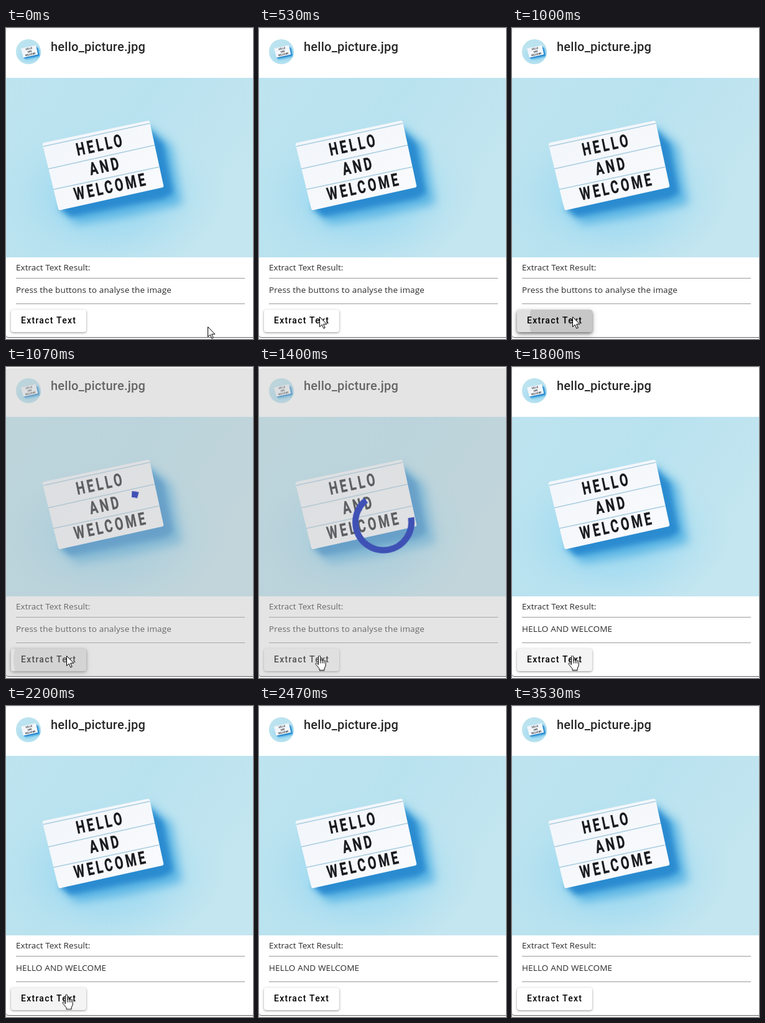
These frames come from a looping animation (397x499 px, 3590 ms). An HTML page:

```html
<!DOCTYPE html>
<html lang="en">
<head>
<meta charset="utf-8">
<title>Extract text</title>
<style>
  html, body { margin: 0; width: 100%; height: 100%; overflow: hidden; background: #f7f7f7; }
  svg { display: block; }

  .title { font: 500 20px Roboto, sans-serif; letter-spacing: .25px; fill: #262626; }
  .body { font: 13.5px "Open Sans", "Noto Sans", sans-serif; letter-spacing: .16px; fill: #2b2b2b; }
  .label { letter-spacing: .05px; }
  .caption { font: 500 14px Roboto, sans-serif; letter-spacing: 1.25px; fill: #000; }
  .sign { font: 700 28px Roboto, sans-serif; letter-spacing: 5.7px; text-anchor: middle; fill: #17191d; stroke: #17191d; stroke-width: .4; }
  .card { fill: #fff; filter: drop-shadow(0 1px .6px #0009); }
  .rule { fill: #9a9a9a; }

  /* Every animation shares one 3590 ms cycle. */
  .prompt, .answer, .busy, .arrow, .hand, .cursor, .button, .state, .ripple, .ring, .arc {
    animation: 3590ms linear infinite;
  }
  .prompt, .answer, .busy, .arrow, .hand { animation-timing-function: step-end; }

  .prompt { animation-name: prompt; }
  .answer { animation-name: answer; }
  .busy { animation-name: busy; }
  .arrow { animation-name: arrow; }
  .hand { animation-name: hand; }
  @keyframes prompt { 0% { opacity: 1; } 50.13%, 100% { opacity: 0; } }
  @keyframes answer { 0% { opacity: 0; } 50.13%, 100% { opacity: 1; } }
  @keyframes busy { 0% { opacity: 0; } 29.8% { opacity: 1; } 50.13%, 100% { opacity: 0; } }
  @keyframes arrow { 0% { opacity: 1; } 39% { opacity: 0; } 64.9%, 100% { opacity: 1; } }
  @keyframes hand { 0% { opacity: 0; } 39% { opacity: 1; } 64.9%, 100% { opacity: 0; } }

  .cursor { animation-name: travel; }
  @keyframes travel {
    0%, 1.95% { transform: translate(324px, 479px); animation-timing-function: ease-in-out; }
    14.76%, 61.2% { transform: translate(97px, 463px); animation-timing-function: ease-in; }
    68.7%, 99.99% { transform: translate(180px, 506px); }
    100% { transform: translate(324px, 479px); }
  }

  .button { fill: #fff; animation-name: lift; }
  @keyframes lift {
    0%, 25.9% { filter: drop-shadow(0 1px 1px #0004) drop-shadow(0 1px 2px #0003); }
    27.8%, 29% { filter: drop-shadow(0 2px 2px #0006) drop-shadow(0 3px 4px #0004); }
    36%, 100% { filter: drop-shadow(0 1px 1px #0004) drop-shadow(0 1px 2px #0003); }
  }

  .state { animation-name: state; }
  @keyframes state {
    0%, 16.7% { opacity: 0; }
    20.3%, 25.9% { opacity: .045; }
    27.8%, 28.5% { opacity: .12; }
    29.8%, 48.2% { opacity: 0; }
    50.13%, 64.9% { opacity: .045; }
    68.7%, 100% { opacity: 0; }
  }

  .ripple { transform-origin: 97px 470px; animation-name: ripple; }
  @keyframes ripple {
    0%, 25.9% { transform: scale(0); opacity: .11; }
    27.86% { transform: scale(.75); }
    29.81% { transform: scale(.92); }
    32.2% { transform: scale(1); opacity: .11; }
    41%, 100% { transform: scale(1); opacity: 0; }
  }

  .ring { transform-origin: 200px 249px; animation-name: spin; }
  @keyframes spin {
    0%, 29.8% { transform: rotate(-87.5deg); }
    50.13%, 100% { transform: rotate(84.5deg); }
  }
  .arc { fill: none; stroke: #3f51b5; stroke-width: 10; animation-name: sweep; }
  @keyframes sweep {
    0%, 29.8% { stroke-dasharray: 13 360; stroke-dashoffset: 0; animation-timing-function: cubic-bezier(.35, 0, .25, 1); }
    46.24% { stroke-dasharray: 288 360; stroke-dashoffset: 0; animation-timing-function: cubic-bezier(.35, 0, .25, 1); }
    62.67%, 100% { stroke-dasharray: 18 360; stroke-dashoffset: -270; }
  }
</style>
</head>
<body>
<svg width="397" height="499" viewBox="0 0 397 499">
  <defs>
    <linearGradient id="sky" x1="0" y1="0" x2="1" y2=".5">
      <stop offset="0" stop-color="#bde4ef"/>
      <stop offset=".5" stop-color="#b9e2ef"/>
      <stop offset="1" stop-color="#c4e6f0"/>
    </linearGradient>
    <radialGradient id="glow">
      <stop offset="0" stop-color="#98d7f0"/>
      <stop offset=".5" stop-color="#a6dcf1" stop-opacity=".8"/>
      <stop offset="1" stop-color="#b9e2ef" stop-opacity="0"/>
    </radialGradient>
    <linearGradient id="face" x1="0" y1="0" x2="1" y2="1">
      <stop offset="0" stop-color="#f1f5fa"/>
      <stop offset="1" stop-color="#fafbfd"/>
    </linearGradient>
    <filter id="soft" x="-30%" y="-30%" width="160%" height="160%"><feGaussianBlur stdDeviation="8"/></filter>
    <filter id="near" x="-30%" y="-30%" width="160%" height="160%"><feGaussianBlur stdDeviation="4"/></filter>
    <clipPath id="frame"><path d="M0 80H400V368H0Z"/></clipPath>
    <clipPath id="round"><circle cx="36" cy="38" r="20"/></clipPath>
    <clipPath id="pill"><rect x="8" y="452" width="121" height="36" rx="4"/></clipPath>

    <g id="photo" clip-path="url(#frame)">
      <path d="M0 80H400V368H0Z" fill="url(#sky)"/>
      <ellipse cx="165" cy="270" rx="190" ry="125" fill="url(#glow)"/>
      <path d="M228 158L266 188 283 282 200 301 114 315 86 289Z" fill="#5cb5e4" filter="url(#soft)"/>
      <path d="M230 162L253 186 269 265 254 274 104 303 86 289Z" fill="#2c8bd0" filter="url(#near)"/>
      <path d="M61 184L227 149Q230 148 231 151L253 252Q254 255 251 256L88 292Q85 293 84 290L59 188Q58 185 61 184Z" fill="url(#face)"/>
      <path d="M60 190L231 153M68 226L239 188M76 259L246 223" fill="none" stroke="#a9cde0" stroke-width="1.4"/>
      <g class="sign">
        <text x="2.8" y="10" transform="translate(149.5 187.5) rotate(-12) scale(.7 1)">HELLO</text>
        <text x="2.8" y="10" transform="translate(157.5 221.5) rotate(-12) scale(.7 1)">AND</text>
        <text x="2.8" y="10" transform="translate(166.5 254.5) rotate(-12) scale(.7 1)">WELCOME</text>
      </g>
    </g>
  </defs>

  <rect class="card" y="2" width="400" height="494" rx="4"/>
  <g clip-path="url(#round)">
    <use href="#photo" transform="translate(16 18) scale(.139) translate(0 -80)"/>
  </g>
  <text class="title" x="72" y="37">hello_picture.jpg</text>
  <use href="#photo"/>

  <text class="body label" x="16" y="389">Extract Text Result:</text>
  <rect class="rule" x="16" y="401" width="368" height="1"/>
  <text class="body prompt" x="16" y="425">Press the buttons to analyse the image</text>
  <text class="body answer" x="16" y="425">HELLO AND WELCOME</text>
  <rect class="rule" x="16" y="442" width="368" height="1"/>

  <rect class="button" x="8" y="452" width="121" height="36" rx="4"/>
  <g clip-path="url(#pill)">
    <rect class="state" x="8" y="452" width="121" height="36"/>
    <circle class="ripple" cx="97" cy="470" r="92"/>
  </g>
  <text class="caption" x="24" y="474">Extract Text</text>

  <g class="busy">
    <rect y="2" width="400" height="494" rx="4" fill="#bfbfbf" fill-opacity=".42"/>
    <g class="ring"><circle class="arc" cx="200" cy="249" r="45" pathLength="360"/></g>
  </g>

  <g class="cursor" fill="#fff" stroke="#000" stroke-linejoin="round">
    <path class="arrow" d="M.5 .5V16.5L4.2 13 6.8 19 9.2 18 6.6 12.2H11.8Z"/>
    <g class="hand" transform="translate(-7 -.5)">
      <path d="M5.5 15V2.2a1.6 1.6 0 0 1 3.2 0V8.5a1.5 1.5 0 0 1 3 .3a1.5 1.5 0 0 1 2.8 .6a1.3 1.3 0 0 1 2.6 .8V17l-2 4v3H7v-2.5L1 14.2c-.6-1.2 1-2.4 2-1.3Z"/>
      <path d="M8.7 8V13M11.7 9V13M14.5 10V13" fill="none"/>
    </g>
  </g>
</svg>
</body>
</html>
```
